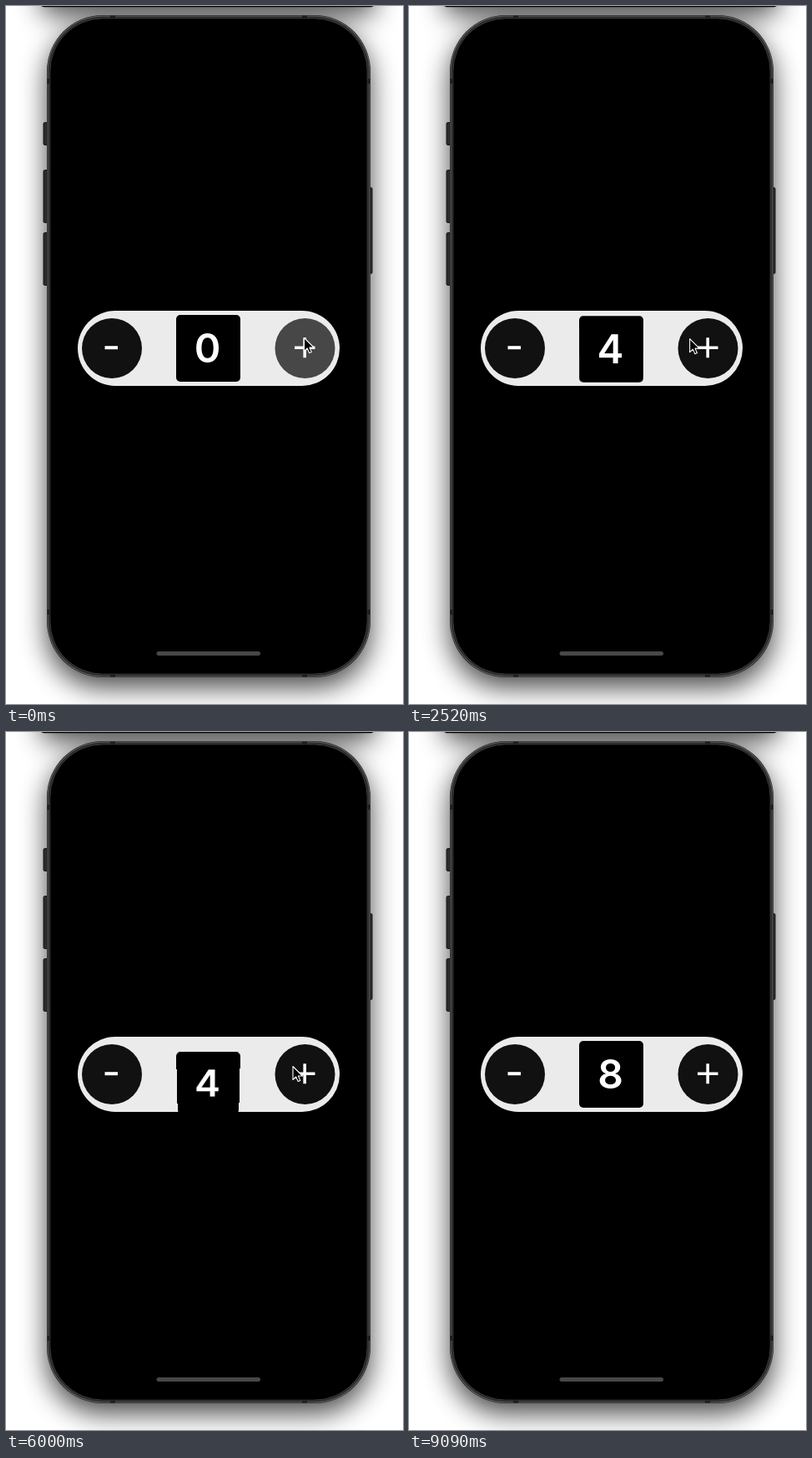
An HTML page for the animation above (9.55 s loop, 476x836 px).

```html
<!DOCTYPE html>
<html lang="en">
<head>
<meta charset="utf-8">
<title>Cube stepper</title>
<style>
html, body { margin: 0; width: 100%; height: 100%; overflow: hidden; background: #fff; }
#stage { position: relative; width: 476px; height: 836px; overflow: hidden; }
svg { position: absolute; left: 0; top: 0; display: block; }
#window { position: absolute; left: 86px; top: 365px; width: 314px; height: 90px; overflow: hidden; border-radius: 45px; }
.face {
  position: absolute; left: 118px; top: 5px; width: 77px; height: 80px;
  border-radius: 5px; background: #000; color: #fff;
  font: 600 48px/80px Inter, "Liberation Sans", sans-serif; text-align: center;
}
.face span { position: relative; left: -1px; }
</style>
</head>
<body>
<div id="stage">
  <svg width="476" height="836" viewBox="0 0 476 836">
    <defs>
      <filter id="blur" filterUnits="userSpaceOnUse" x="-100" y="-150" width="676" height="1100">
        <feGaussianBlur stdDeviation="16"/>
      </filter>
    </defs>
    <rect width="476" height="836" fill="#fff"/>
    <g filter="url(#blur)" opacity=".72">
      <rect x="43" y="-90" width="398" height="100"/>
      <rect x="49" y="24" width="388" height="792" rx="66"/>
    </g>
    <path d="M42 0H441L438 1.2H45Z"/>

    <g fill="#2b2b2c" stroke="#161617" stroke-width="1">
      <rect x="45" y="139.500" width="6" height="27" rx="1.500"/>
      <rect x="45" y="196.500" width="6" height="63" rx="1.500"/>
      <rect x="45" y="271.500" width="6" height="63" rx="1.500"/>
      <rect x="434" y="217.500" width="5" height="103" rx="1.500"/>
    </g>
    <rect x="49" y="11" width="388" height="793" rx="67" fill="#1c1c1d"/>
    <rect x="50.200" y="12.200" width="385.600" height="790.600" rx="66" fill="#2a2a2b" stroke="#58585a" stroke-width="1.200"/>
    <rect x="52.800" y="14.800" width="380.400" height="785.400" rx="63.500" stroke="#3a3a3b" stroke-width="1"/>
    <rect x="54.500" y="16.500" width="377" height="782" rx="62"/>
    <path d="M125 13h6M355 13h6M125 802h6M355 802h6M51 87v6M435 87v6M51 723v6M435 723v6" stroke="#1e1e1f" stroke-width="3"/>
    <rect x="180.500" y="773" width="124.500" height="5" rx="2.500" fill="#48484a"/>

    <rect x="86" y="365" width="314" height="90" rx="45" fill="#ebebeb"/>
    <g id="minus">
      <circle cx="127" cy="410" r="36" fill="#111"/>
      <path d="M118.500 409.200H134" stroke="#fff" stroke-width="4"/>
    </g>
    <g id="plus">
      <circle cx="358.500" cy="410" r="36" fill="#111"/>
      <path d="M346 409.200H370.500M358.200 397.200V421.200" stroke="#fff" stroke-width="3.600"/>
    </g>
  </svg>

  <div id="window">
    <div class="face" id="old"><span></span></div>
    <div class="face" id="now"><span></span></div>
  </div>

  <svg width="476" height="836" viewBox="0 0 476 836">
    <g id="cursor">
      <g id="ring" fill="none" stroke="#fff" stroke-width="1.200">
        <circle cy="2" r="20.300" stroke="#000" stroke-width="3" stroke-opacity=".7"/>
        <circle cy="2" r="22"/>
        <circle cy="2" r="18.800"/>
      </g>
      <path d="M0 0V16L3.700 12.500L6.200 18L8.800 16.900L6.400 11.500H11.600Z" stroke="#fff" stroke-width="1.100" stroke-linejoin="round"/>
    </g>
  </svg>
</div>

<script>
const LOOP = 9550, FACE = 80, DIM = 0.23;
const $ = id => document.getElementById(id);

// Release time of each click and the number it leads to.
const clicks = [
  [85, 1], [607, 2], [1130, 3], [1745, 4], [3055, 3], [4095, 2],
  [4785, 3], [5652, 4], [6605, 5], [7115, 6], [7650, 7], [8180, 8]
].map(([at, value], i, all) => ({ at, value, minus: i > 0 && value < all[i - 1][1] }));

// Pointer stops: time, x, y.
const route = [
  [0, 357.5, 397.5], [2450, 357.5, 397.5], [2830, 130, 410], [3060, 130, 410],
  [3250, 141, 411], [4110, 141, 411], [4620, 344, 400.5], [8560, 344, 400.5],
  [8790, 380, 446], [9060, 459, 447]
];

const clamp = v => Math.min(1, Math.max(0, v));
const mix = (a, b, u) => a + (b - a) * u;
const smooth = u => u * u * (3 - 2 * u);

function spring(ms) {
  if (ms <= 0) return 0;
  const w = 12.57, z = 0.4, s = ms / 1000, k = Math.sqrt(1 - z * z), a = w * k * s;
  return 1 - Math.exp(-z * w * s) * (Math.cos(a) + z / k * Math.sin(a));
}

function opacity(ms) {
  if (ms < -110 || ms > 280) return 1;
  return ms < 0 ? mix(1, DIM, clamp((ms + 110) / 80)) : mix(DIM, 1, ms / 280);
}

// Each face hinges on the edge nearest the middle of the cube.
function turn(el, value, off, shown) {
  el.style.visibility = shown ? "visible" : "hidden";
  el.firstChild.textContent = value;
  el.style.transformOrigin = off > 0 ? "50% 0" : "50% 100%";
  el.style.transform = Math.abs(off) < 0.002 ? "none" :
    `translateY(${off * FACE}px) perspective(423px) rotateX(${-off * 90}deg)`;
}

function pointer(t) {
  let i = 0;
  while (i < route.length - 2 && t >= route[i + 1][0]) i++;
  const [t0, x0, y0] = route[i], [t1, x1, y1] = route[i + 1];
  const u = smooth(clamp((t - t0) / (t1 - t0)));
  return [mix(x0, x1, u), mix(y0, y1, u)];
}

function draw(t) {
  const done = clicks.filter(c => t > c.at), n = done.length;
  const off = done.reduce((sum, c) => sum + spring(t - c.at), 0) - n;
  const value = i => i ? clicks[i - 1].value : 0;
  const entering = n > 0 && t - clicks[n - 1].at < 172 && off < 0;
  turn($("now"), value(n), t > 9060 ? 0 : off, !entering || off > -1);
  turn($("old"), value(Math.max(0, n - 1)), off + 1, entering);

  for (const id of ["minus", "plus"]) {
    const own = clicks.filter(c => c.minus === (id === "minus"));
    $(id).setAttribute("opacity", Math.min(...own.map(c => opacity(t - c.at))));
  }

  const [x, y] = pointer(t);
  $("cursor").setAttribute("transform", `translate(${x} ${y})`);
  $("cursor").setAttribute("visibility", t < 9060 ? "visible" : "hidden");
  const pressed = clicks.some(c => t >= c.at - 200 && t < c.at - 112);
  $("ring").setAttribute("display", pressed ? "inline" : "none");
}

function tick() {
  draw(performance.now() % LOOP);
  requestAnimationFrame(tick);
}
tick();
</script>
</body>
</html>
```
